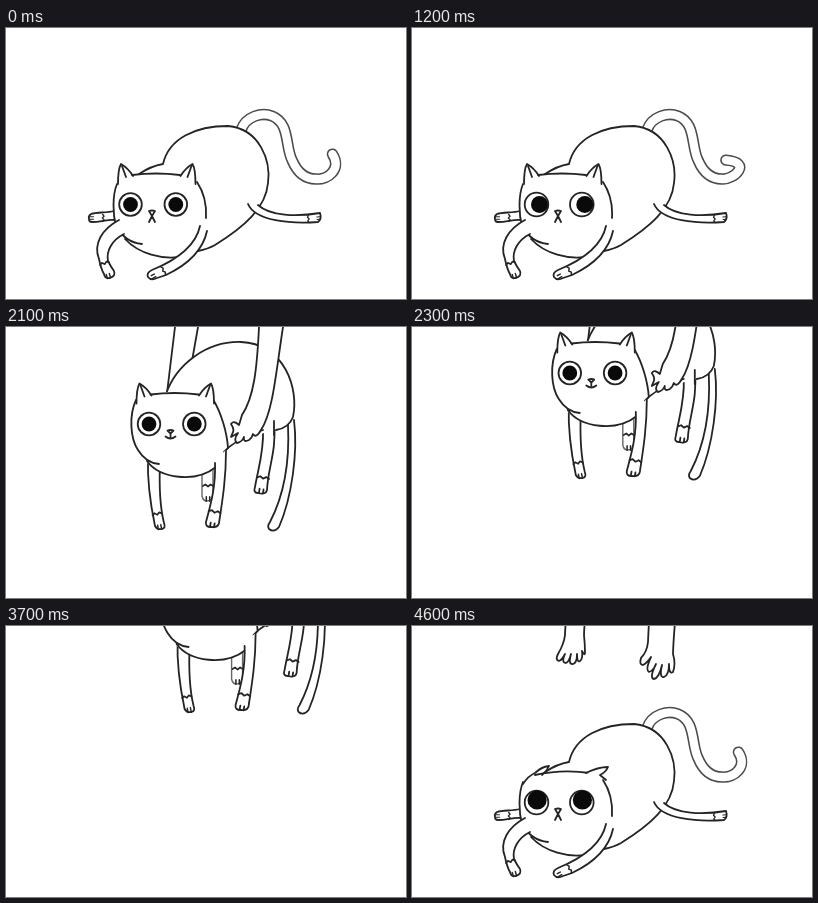
These frames come from a looping animation (400x271 px, 4700 ms). An HTML page:

```html
<!DOCTYPE html>
<html lang="en">
<head>
<meta charset="utf-8">
<title>Cat pickup</title>
<style>
html, body { margin: 0; width: 100%; height: 100%; overflow: hidden; background: #fff; }
svg { display: block; width: 100%; height: 100%; }
path, circle { stroke: #242424; stroke-width: 1.8; fill: none; stroke-linecap: round; stroke-linejoin: round; }
.w { fill: #fff; }
.f { fill: #fff; stroke: none; }
.g { stroke: #666; stroke-width: 1.4; }
.p { fill: #0a0a0a; stroke: none; }
.tail { stroke: #4c4c4c; stroke-width: 11.4; }
.core { stroke: #fff; stroke-width: 8.3; }
</style>
</head>
<body>
<svg viewBox="0 0 400 271">
  <defs>
    <path id="paw" d="M-6 -15L-3 -16.500L0 -14.500L3 -16.500L6 -15M-2 0V-4M2 0V-4"/>
    <g id="ear">
      <path class="w" d="M112 156C112 149 112 141 115 136Q122 140 127 148"/>
      <path d="M116 138L120 149"/>
    </g>
  </defs>

  <g id="ground">
    <path class="tail"/><path class="core"/>
    <path class="w" d="M108 183C100 185 91 184 85 186Q82 188 83 191Q83 194 86 194C95 194 102 191 109 192"/>
    <use href="#paw" transform="translate(84 190) rotate(90) scale(.6 .85)"/>
    <path class="f" d="M133 146Q145 138 157 136C163 110 190 98 222 98C254 101 265 133 262 155C260 180 238 199 209 217L180 228L140 210Z"/>
    <path d="M133 146Q145 138 157 136C163 110 190 98 222 98C254 101 265 133 262 155C260 180 238 199 209 217Q202 221 192 223"/>
    <path class="w" d="M242 176C249 193 285 196 312 194Q316 191 314 185C290 189 264 188 252 177"/>
    <use href="#paw" transform="translate(314 190) rotate(-95) scale(.6 .75)"/>
    <path class="f" d="M113 153C106 165 106 190 112 200C125 224 155 234 181 228L200 205C201 185 196 167 190 153Q150 140 113 153Z"/>
    <path d="M111 156C106 168 107 187 110 198C116 209 126 215 136 216M119 211C132 225 156 233 179 228M191 154C197 163 201 174 200 190"/>
    <path class="w" d="M113 192C96 201 87 216 93 231Q95 241 98 246Q99 251 104 250Q110 248 108 243Q105 239 102 233C100 223 106 212 118 206"/>
    <use href="#paw" transform="translate(103 250) rotate(-17) scale(.8 1)"/>
    <path class="w" d="M194 198C190 217 173 231 146 242Q140 245 142 249Q145 253 151 250L160 247C181 237 197 222 201 203"/>
    <use href="#paw" transform="translate(146 249) rotate(61) scale(.75 .85)"/>
  </g>

  <g id="lifted">
    <path class="w" d="M180 -90L169 0L161 66L186 34L192 0L204 -90"/>
    <path class="w" d="M288 93C292 125 286 170 273 200Q268 206 263 202Q261 199 264 195C277 170 284 140 282 98"/>
    <path class="w" d="M257 103C258 125 252 142 249 160Q247 166 252 166Q260 168 261 163C262 140 271 124 268 94"/>
    <use href="#paw" transform="translate(255 166) rotate(8)"/>
    <path class="w g" d="M196 146L196 169Q197 174 201 174Q206 174 207 168L207 142"/>
    <use href="#paw" transform="translate(202 174) scale(.85 1)"/>
    <path class="f" d="M160 67C170 38 200 14 235 15C277 17 292 62 286 90Q282 102 265 104Q240 110 219 124L200 140Z"/>
    <path d="M160 67C170 38 200 14 235 15C279 17 293 62 287 90Q283 101 270 103M257 103Q238 108 219 123M268 94V108"/>
    <path class="w" d="M142 130C141 158 145 180 149 199Q151 203 156 202Q160 201 158 196C154 180 153 160 154 135"/>
    <use href="#paw" transform="translate(154 202) rotate(-11) scale(.8 1)"/>
    <path class="f" d="M131 70C122 85 124 115 133 126C150 153 188 157 210 141L222 122C220 100 214 80 207 69Q168 60 131 70Z"/>
    <path d="M130 73C123 88 124 111 132 123Q140 136 153 137M141 134C154 152 190 156 210 140M208 74C215 86 221 105 222 121L218 125"/>
    <path class="f" d="M209 133C211 160 204 180 201 195L212 197C217 170 220 150 220 123Z"/>
    <path d="M209 136C210 160 204 180 200 195Q199 200 205 200Q212 201 213 196C217 170 220 150 220 124"/>
    <use href="#paw" transform="translate(206 200) rotate(10)"/>
  </g>

  <g id="face">
    <g id="earsUp">
      <use href="#ear"/>
      <use href="#ear" transform="translate(301.500 0) scale(-1 1)"/>
      <path d="M126 147Q150 144 174 147"/>
    </g>
    <g id="earsFlat">
      <path class="w" d="M111 158Q116 150 123 147Q129 141 137 140Q135 145 130 149"/>
      <path d="M123 149Q150 143 178 147"/>
      <path class="w" d="M174 147Q186 141 196 141Q194 146 188 149L194 154"/>
    </g>
    <g id="eyes"></g>
    <path id="sad" d="M143 183Q146 182 149 183L146 188ZM143 194L146 188L149 194"/>
    <path id="smile" d="M143 183Q146 182 149 183L146 186ZM146 186V189M141 189Q146 193 151 189"/>
  </g>

  <path class="w" id="arm" d="M262 -90L253 0C251 42 248 70 236 88L233 98Q228 93 225 97C230 104 226 106 225 110L232 106Q227 113 231 116Q236 115 238 110Q237 116 243 113Q246 111 247 107Q250 112 255 103C267 85 270 45 277 0L289 -90"/>
  <path class="w" id="handL" d="M152 -30L150 0C149 40 145 70 144 97Q143 106 137 116Q134 122 138 123Q141 122 144 116Q140 125 145 125Q148 124 150 116Q147 127 152 126Q156 125 156 116Q156 125 159 123Q162 121 161 113Q164 119 164 114Q164 107 163 97C164 60 174 35 177 0L180 -30"/>
  <path class="w" id="handR" d="M231 -30L229 0C226 45 222 90 220 138Q219 148 213 154Q211 161 215 161Q219 159 223 153Q217 166 221 168Q225 167 228 160Q221 174 226 175Q231 174 234 161Q231 174 236 173Q241 171 241 160Q241 171 245 168Q248 160 245 150C246 110 254 60 258 0L260 -30"/>
</svg>
<script>
const $ = id => document.getElementById(id);
const LOOP = 4700, STEP = 100;
const show = (el, on) => { el.style.display = on ? '' : 'none'; };
const move = (el, x, y) => el.setAttribute('transform', `translate(${x} ${y})`);

const LOOKS = {
  front: { dx: 0, dy: 0, r: 7.4, ring: 11.3 },
  right: { dx: 3, dy: 0, r: 8.5, ring: 11.8 },
  wide: { dx: 1, dy: -1.2, r: 9.8, ring: 11.8 },
  up: { dx: 0.6, dy: -2.5, r: 9.6, ring: 11.8 },
};
const lookAt = t =>
  t >= 4300 ? 'up' : t >= 3700 ? 'wide' : t >= 800 && t < 1500 ? 'right' : 'front';

// one flick of the tail: slowly in (+1), quickly out (-1), then to rest
function flick(t, start) {
  const k = Math.min(Math.max((t - start) / 600, 0), 1);
  return Math.sin(2 * Math.PI * k ** 1.8);
}
function tailPath(s) {
  const a = 0.1 - 0.55 * s;
  const x = 324 + 24 * Math.sin(a), y = 150 - 24 * Math.cos(a) + 4 * Math.max(s, 0);
  return 'M235 102C240 88 256 84 266 88C284 95 279 118 286 132C291 144 299 151 310 151' +
    `C322 152 ${336 + 5 * s} ${141 - 7 * s} ${x} ${y}`;
}

// the cat goes up from 2000 and comes down, mirrored, until 4300
function liftAt(t) {
  const up = t >= 2000 && t < 2700, down = t >= 3700 && t < 4300;
  if (!up && !down) return null;
  const n = (up ? t - 2000 : 4200 - t) / STEP;
  const m = n ? n - 1 : -1.9; // the first step off the floor is longer
  return [7.4 * m, -22 * m - 1.75 * m * m];
}

// height of the empty hands: 0 at the cat, 1 near the top
function handsAt(t) {
  if (t >= 1600 && t < 2000) return Math.max((1800 - t) / 200, -0.05);
  return t >= 4300 ? (t - 4300) / 300 : null;
}

function addCircle(cls, x) {
  const c = document.createElementNS('http://www.w3.org/2000/svg', 'circle');
  c.setAttribute('class', cls);
  c.setAttribute('cx', x);
  c.setAttribute('cy', 176.5);
  return $('eyes').appendChild(c);
}
const eyes = [124.5, 169.8].map(x => ({ ring: addCircle('w', x), pupil: addCircle('p', x) }));
const tail = document.querySelectorAll('.tail, .core');

function draw(t) {
  const lift = liftAt(t), hands = handsAt(t), look = LOOKS[lookAt(t)];
  const away = t >= 2700 && t < 3700;
  const [x, y] = lift || [0, 0];
  show($('ground'), !lift && !away);
  show($('lifted'), lift);
  show($('arm'), lift);
  show($('face'), !away);
  move($('lifted'), x, y);
  move($('arm'), x, y);
  move($('face'), lift ? x + 18.5 : 0, lift ? y - 79.5 : 0);

  const flat = t >= 1600 && !lift;
  show($('earsFlat'), flat);
  show($('earsUp'), !flat);
  const happy = lift && t < 3700;
  show($('smile'), happy);
  show($('sad'), !happy);
  for (const { ring, pupil } of eyes) {
    ring.setAttribute('r', look.ring);
    pupil.setAttribute('r', look.r);
    move(pupil, look.dx, look.dy);
  }

  const d = tailPath(flick(t, 100) + flick(t, 900));
  tail.forEach(p => p.setAttribute('d', d));

  show($('handL'), hands !== null);
  show($('handR'), hands !== null);
  move($('handL'), 9 * hands, -88 * hands);
  move($('handR'), 16 * hands, -122 * hands);
}

const begin = performance.now();
function tick() {
  const t = (performance.now() - begin) % LOOP;
  draw(Math.floor(t / STEP) * STEP);
  requestAnimationFrame(tick);
}
tick();
</script>
</body>
</html>
```
